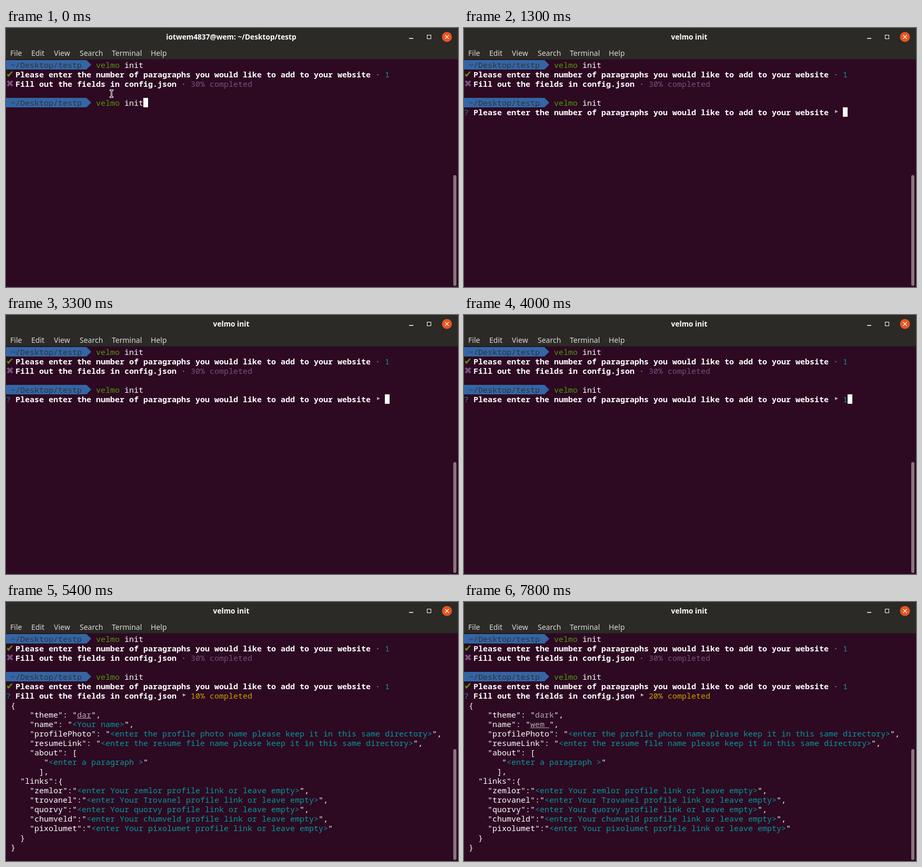
These frames come from a looping animation (859 px wide and 493 px high, 8 s). An HTML page with a canvas:

```html
<!DOCTYPE html>
<html lang="en">
<head>
<meta charset="utf-8">
<title>Terminal</title>
<style>
  html, body { margin: 0; width: 100%; height: 100%; overflow: hidden; background: #2d0922; }
  canvas { display: block; }
</style>
</head>
<body>
<canvas id="stage" width="859" height="493"></canvas>
<script>
const ctx = document.getElementById('stage').getContext('2d');
const LOOP = 8000, CELL = 9, LINE = 18, TOP = 61;
const MONO = '15px "Noto Sans Mono", monospace';
const SANS = '"Noto Sans", "Open Sans", sans-serif';
const C = {
  bg: '#2d0922', bar: '#2b2a27', white: '#ffffff', dim: '#b2a6ae', menu: '#dad8d4',
  blue: '#3465a4', ink: '#2e3436', green: '#4e9a06', teal: '#06989a',
  purple: '#75507b', yellow: '#c4a000', orange: '#e95420', thumb: '#89747f'
};
const USER = 'wem', APP = 'velmo';
const ASK = 'Please enter the number of paragraphs you would like to add to your website';
const FILL = 'Fill out the fields in config.json';
const MENU = [['File', 8], ['Edit', 48], ['View', 91], ['Search', 140], ['Terminal', 201], ['Help', 275]];

// Cursor visibility flips at each of these times.
const BLINKS = [100, 700, 1800, 2400, 3000, 3300, 3900, 4000];
const START = 1300, DIGIT = 3500, FORM = 4500, NEXT = 6800;
const THEME_KEYS = [5100, 5200, 5400, 5900];
const NAME_KEYS = [7200, 7400, 7600, 7800];

const site = name => `     "${name}":"<enter Your ${name} profile link or leave empty>"`;
const REST = [
  '     "profilePhoto": "<enter the profile photo name please keep it in this same directory>",',
  '     "resumeLink": "<enter the resume file name please keep it in this same directory>",',
  '     "about": [',
  '        "<enter a paragraph >"',
  '       ],',
  '   "links":{',
  site('zemlor') + ',',
  site('trovanel').replace('Your t', 'Your T') + ',',
  site('quorvy') + ',',
  site('chumveld') + ',',
  site('pixolumet'),
  '   }',
  ' }'
];

const rowY = row => TOP + row * LINE;
const pressed = (keys, t) => keys.filter(k => t >= k).length;

function box(color, x, y, w, h) {
  ctx.fillStyle = color;
  ctx.fillRect(x, y, w, h);
}

function poly(color, points) {
  ctx.fillStyle = color;
  ctx.beginPath();
  points.forEach(([x, y]) => ctx.lineTo(x, y));
  ctx.fill();
}

function put(text, col, row, color = C.white, bold = false) {
  ctx.font = (bold ? 'bold ' : '') + MONO;
  ctx.fillStyle = color;
  ctx.fillText(text, col * CELL, rowY(row) + 15);
  return col + text.length;
}

function symbol(char, row, color) {
  ctx.font = '18px "DejaVu Sans", sans-serif';
  ctx.fillStyle = color;
  ctx.fillText(char, 0, rowY(row) + 15);
}

function pointer(col, row) {
  const x = col * CELL, y = rowY(row);
  poly(C.dim, [[x + 3, y + 5], [x + 9, y + 8], [x + 3, y + 11]]);
}

function cursor(col, row) {
  box(C.white, col * CELL, rowY(row), CELL, LINE);
}

function prompt(row) {
  const y = rowY(row);
  poly(C.blue, [[0, y], [153, y], [162, y + 9], [153, y + LINE], [0, y + LINE]]);
  put('~/Desktop/testp', 1, row, C.ink);
  put(APP, 19, row, C.green);
  put('init', 25, row);
}

function answered(row) {
  symbol('✔', row, C.green);
  put(ASK, 2, row, C.white, true);
  put('·', 78, row, C.dim);
  put('1', 80, row, C.teal);
}

function jsonLine(line, row) {
  let col = 0;
  for (const part of line.split(/(<[^>]*>)/)) {
    col = put(part, col, row, part[0] === '<' ? C.teal : C.white);
  }
}

function field(key, hint, value, active, row) {
  const start = put(`"${key}": "`, 5, row);
  const color = value ? C.dim : C.teal;
  const end = put(value || hint, start, row, color);
  if (active) box(color, start * CELL, rowY(row) + 16, (end - start) * CELL, 1);
  put('",', end, row);
}

function form(t) {
  const theme = 'dark'.slice(0, pressed(THEME_KEYS, t));
  const name = (USER + ' ').slice(0, pressed(NAME_KEYS, t));
  const percent = (theme ? 10 : 0) + (name ? 10 : 0);
  answered(5);
  put('?', 0, 6, C.teal);
  put(FILL, 2, 6, C.white, true);
  pointer(37, 6);
  put(percent + '% completed', 39, 6, C.yellow);
  put('{', 1, 7);
  field('theme', '<Theme (dark or light)>', theme, t < NEXT, 8);
  field('name', '<Your name>', name, t >= NEXT, 9);
  REST.forEach((line, i) => jsonLine(line, 10 + i));
}

function question(t, blink) {
  const typed = t >= DIGIT;
  put('?', 0, 5, C.teal);
  put(ASK, 2, 5, C.white, true);
  pointer(78, 5);
  if (typed) put('1', 80, 5, C.teal);
  if (blink) cursor(typed ? 81 : 80, 5);
}

function mouse() {
  const beam = (color, grow) => {
    box(color, 200 - grow, 118 - grow, 1 + 2 * grow, 14 + 2 * grow);
    for (const y of [118, 131]) box(color, 198 - grow, y - grow, 5 + 2 * grow, 1 + 2 * grow);
  };
  beam(C.white, 1);
  beam('#111111', 0);
}

function chrome(title) {
  box(C.bar, 0, 0, 859, 60);
  box('#22201e', 0, 59, 859, 1);
  ctx.textAlign = 'center';
  ctx.font = 'bold 13.7px ' + SANS;
  ctx.fillStyle = C.white;
  ctx.fillText(title, 428, 22);
  ctx.textAlign = 'left';
  ctx.font = '14px ' + SANS;
  ctx.fillStyle = C.menu;
  MENU.forEach(([label, x]) => ctx.fillText(label, x, 53));

  box(C.white, 766, 19, 8, 1.5);
  ctx.strokeStyle = C.white;
  ctx.lineWidth = 1;
  ctx.strokeRect(800.5, 13.5, 7, 7);
  ctx.fillStyle = C.orange;
  ctx.beginPath();
  ctx.arc(838, 17, 9.5, 0, Math.PI * 2);
  ctx.fill();
  ctx.lineWidth = 1.2;
  ctx.beginPath();
  for (const s of [-1, 1]) {
    ctx.moveTo(834.5, 17 - 3.5 * s);
    ctx.lineTo(841.5, 17 + 3.5 * s);
  }
  ctx.stroke();

  ctx.fillStyle = C.thumb;
  ctx.beginPath();
  ctx.roundRect(850, 280, 6, 211, 3);
  ctx.fill();
}

function draw(t) {
  const blink = pressed(BLINKS, t) % 2 === 0;
  box(C.bg, 0, 0, 859, 493);
  chrome(t < START ? `iot${USER}4837@${USER}: ~/Desktop/testp` : APP + ' init');

  prompt(0);
  answered(1);
  symbol('✖', 2, C.purple);
  put(FILL, 2, 2, C.white, true);
  put('·', 37, 2, C.dim);
  put('30% completed', 39, 2, C.purple);
  prompt(4);

  if (t < START) {
    if (blink) cursor(29, 4);
  } else if (t < FORM) {
    question(t, blink);
  } else {
    form(t);
  }
  if (t < 1200) mouse();
}

const begin = performance.now();
function tick() {
  draw((performance.now() - begin) % LOOP);
  requestAnimationFrame(tick);
}
tick();
</script>
</body>
</html>
```
